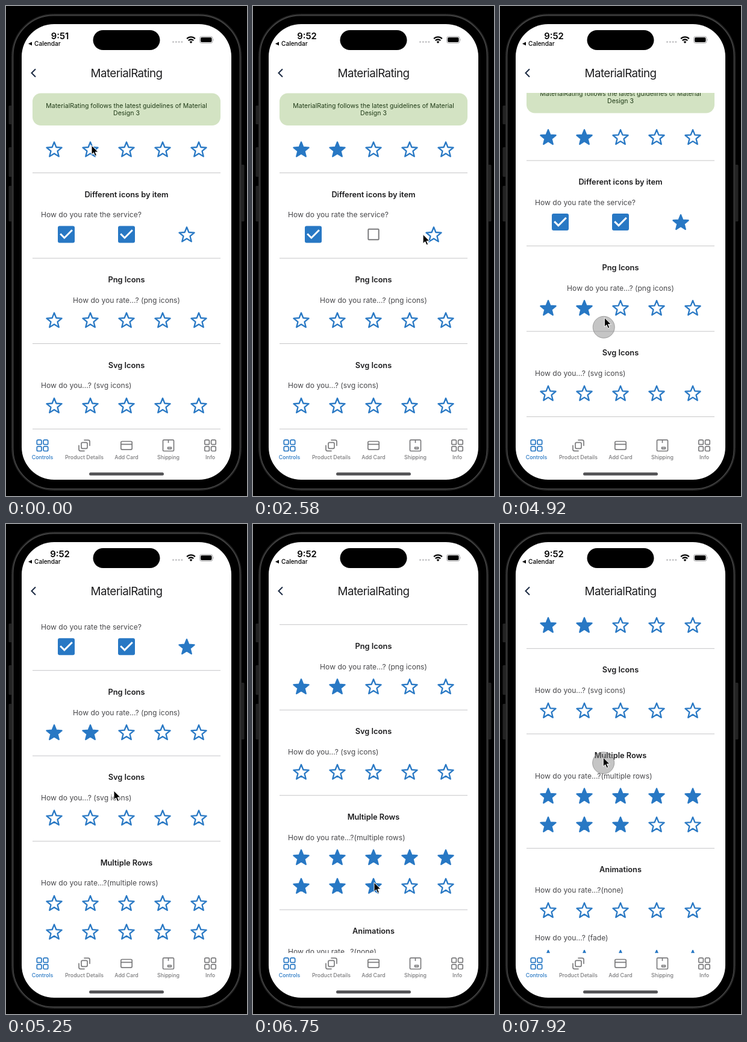
These frames come from a looping animation (400 by 812 pixels, 8000 ms). An HTML page:

```html
<!DOCTYPE html>
<html lang="en">
<head>
<meta charset="utf-8">
<title>Rating controls</title>
<style>
  html, body { margin: 0; width: 100%; height: 100%; overflow: hidden; background: #000; }
  svg { display: block; width: 100%; height: 100%; }
  text { font-family: Inter, Roboto, sans-serif; }
  .middle { text-anchor: middle; }
  .heading { font-size: 12.8px; font-weight: 600; fill: #1c1c1e; text-anchor: middle; }
  .label { font-size: 12.1px; fill: #49494c; }
  .banner { font-size: 10.5px; fill: #1f3a16; text-anchor: middle; }
  .title { font-size: 18.8px; letter-spacing: -.6px; fill: #1c1c1e; text-anchor: middle; }
  .tab { font-size: 8.8px; font-weight: 500; text-anchor: middle; }
  .icon { fill: none; stroke-width: 1.7; stroke-linejoin: round; stroke-linecap: round; }
</style>
</head>
<body>
<svg id="stage" viewBox="0 0 400 812"></svg>
<script>
const LOOP = 8000, BLUE = '#2878c4', GREY = '#7b7b7d';
const COLUMNS = [80, 140, 200, 260, 320];

// Rating of each control over time
const ratings = {
  basic: t => t < 330 ? 0 : 2,
  mixed: t => t < 1580 ? 2 : t < 2930 ? 1 : 3,
  png: t => t < 3880 ? 0 : 2,
  rows: t => t < 6580 ? 0 : 8,
  none: () => 0
};

const rect = (x, y, w, h, r, attrs) =>
  `<rect x="${x}" y="${y}" width="${w}" height="${h}" rx="${r}" ${attrs}/>`;
const text = (cls, x, y, content, attrs = '') =>
  `<text class="${cls}" x="${x}" y="${y}" ${attrs}>${content}</text>`;
const heading = (y, content) => text('heading', 200, y + 4.5, content);
const label = (y, content) => text('label', 58, y + 4.3, content);
const divider = y => rect(44, y - .5, 312, 1, 0, 'fill="#c6c6c8"');

// An item holds its filled and empty looks; only one is shown at a time
const item = (control, index, x, y, on, off) =>
  `<g class="item" data-control="${control}" data-index="${index}" transform="translate(${x} ${y})">
    <g>${on}</g><g>${off}</g></g>`;
const starPoints = Array.from({ length: 10 }, (_, i) => {
  const radius = i % 2 ? 5.8 : 13.2, angle = i * Math.PI / 5;
  return `${(radius * Math.sin(angle)).toFixed(2)},${(1.2 - radius * Math.cos(angle)).toFixed(2)}`;
}).join(' ');
const starShape = fill =>
  `<polygon points="${starPoints}" fill="${fill}" stroke="${BLUE}" stroke-width="2.3" stroke-linejoin="round"/>`;
const star = (control, index, x, y) =>
  item(control, index, x, y, starShape(BLUE), starShape('#fff'));
const starRow = (control, y, first = 0) =>
  COLUMNS.map((x, i) => star(control, first + i, x, y)).join('');
const checkbox = (index, x, y) => item('mixed', index, x, y,
  rect(-14, -14, 28, 28, 3, `fill="${BLUE}"`) +
    '<path d="M-9.8-1l6.7 6.7L9.8-7.2" fill="none" stroke="#fff" stroke-width="3"/>',
  rect(-8.7, -8.7, 17.4, 17.4, 1.2, `fill="none" stroke="${GREY}" stroke-width="2"`));

const content = [
  rect(44, 144.5, 312, 53.5, 14, 'fill="#d3e3c3"'),
  text('banner', 200, 169, 'MaterialRating follows the latest guidelines of Material'),
  text('banner', 200, 181.3, 'Design 3'),
  starRow('basic', 237.5), divider(276.5),
  heading(312, 'Different icons by item'), label(346, 'How do you rate the service?'),
  checkbox(0, 100, 378.5), checkbox(1, 200, 378.5), star('mixed', 2, 300, 378.5), divider(418),
  heading(453.5, 'Png Icons'),
  text('label middle', 200, 492, 'How do you rate...? (png icons)'),
  starRow('png', 520.5), divider(559.5),
  heading(595, 'Svg Icons'), label(629, 'How do you...? (svg icons)'),
  starRow('none', 662), divider(701),
  heading(736.5, 'Multiple Rows'), label(770.5, 'How do you rate...?(multiple rows)'),
  starRow('rows', 803.5), starRow('rows', 851, 5), divider(890.5),
  heading(926, 'Animations'), label(960, 'How do you rate...?(none)'),
  starRow('none', 993), label(1039, 'How do you...? (fade)'), starRow('none', 1072)
].join('');

const gridIcon = [[-9.2, -9.2], [1.6, -9.2], [-9.2, 1.6], [1.6, 1.6]]
  .map(([x, y]) => rect(x, y, 7.6, 7.6, 1.8, '')).join('');
const tabs = [
  ['Controls', 60.5, gridIcon],
  ['Product Details', 130, rect(-5, -5, 10, 10, 2, '') +
    '<path d="M0-9h6.5q2.5 0 2.5 2.5V0M-9 0v6.5Q-9 9-6.5 9H0"/>'],
  ['Add Card', 200, rect(-9.2, -6.8, 18.4, 13.6, 2, '') + '<path d="M-9-2H9"/>'],
  ['Shipping', 269.5, rect(-9, -9.2, 18, 18.4, 1.5, '') + '<path d="M0-9v4"/>' + rect(-1, 3, 6, 2.5, .5, '')],
  ['Info', 339, gridIcon]
].map(([name, x, icon], i) => {
  const color = i ? GREY : BLUE;
  return `<g class="icon" stroke="${color}" transform="translate(${x} 728.3)">${icon}</g>` +
    text('tab', x, 751.3, name, `fill="${color}"`);
}).join('');

const phone = [
  [4.5, 165, 31], [4.5, 234, 49], [4.5, 298, 59], [390, 263, 94]
].map(([x, y, h]) => rect(x, y, 5.5, h, 1.5, 'fill="#232323"')).join('') +
  rect(9.5, 13.5, 381, 789, 69, 'fill="#111" stroke="#2b2b2b"') +
  rect(11.5, 15.5, 377, 785, 67, 'fill="#000" stroke="#424242" stroke-width="1.8"') +
  rect(26, 30, 348, 755, 54, 'fill="#fff"');

const statusBar =
  text('middle', 89.5, 54.5, '', 'id="clock" font-size="14.8" font-weight="600"') +
  '<path d="M37 62.5l6-3v6z"/>' +
  text('', 47, 66.2, 'Calendar', 'font-size="10.1" font-weight="500"') +
  rect(144.5, 40, 111, 33, 16.5, '') +
  [277.5, 282.3, 287.1, 291.9].map(x => `<circle cx="${x}" cy="59.5" r="1.5" fill="#c4c4c6"/>`).join('') +
  `<g fill="none" stroke="#000" stroke-width="2.3">
    <path d="M300.2 54.2a9.6 9.6 0 0 1 13.6 0M302.8 57.2a6 6 0 0 1 8.4 0"/></g>
  <path d="M307 62l-2.3-2.6a3.4 3.4 0 0 1 4.6 0z"/>` +
  rect(321.5, 50.5, 21.5, 11, 3.2, 'fill="none" stroke="#a0a0a2"') +
  rect(323, 52, 18.5, 8, 2, '') + '<path d="M344.3 54.2q1.6 1.8 0 3.6z" fill="#a0a0a2"/>';

const stage = document.getElementById('stage');
stage.innerHTML = `
  <clipPath id="viewport"><rect x="26" y="144" width="348" height="567"/></clipPath>
  <rect width="400" height="812"/>
  ${phone}${statusBar}
  <path d="M49 104.5l-6.5 6.5 6.5 6.5" fill="none" stroke="#1b2a42" stroke-width="2"/>
  ${text('title', 200, 117.8, 'MaterialRating')}
  <g clip-path="url(#viewport)"><g id="scroller">${content}</g></g>
  ${tabs}
  ${rect(138, 773, 124, 5, 2.5, 'fill="#555558"')}
  <circle id="touch" r="18" fill="#7c7c7c" fill-opacity=".44" stroke="#8c8c8c" stroke-width=".8"/>
  <path id="cursor" d="M0 0v15.2l3.5-3.3 2.4 5.6 2.6-1.1-2.4-5.4h4.9z" stroke="#fff" stroke-width="1"/>`;

const [clock, scroller, touch, cursor] =
  ['clock', 'scroller', 'touch', 'cursor'].map(id => document.getElementById(id));
const items = [...document.querySelectorAll('.item')];

const smooth = u => u * u * (3 - 2 * u);
const flick = u => u * u;

// Cursor stops: time, x, y, easing of the way there
const stops = [
  [0, 142, 231], [550, 142, 231], [1050, 201, 372], [2220, 201, 372], [2720, 301, 380],
  [3150, 301, 380], [3700, 142, 514], [4050, 142, 514], [4500, 171, 548.7], [4745, 171, 548.7],
  [5066, 179, 442, flick], [5900, 179, 442], [6350, 201, 594], [6850, 201, 594],
  [7300, 176, 500.2], [7420, 176, 500.2], [LOOP, 171, 380.8]
];
const presses = [[250, 390], [1500, 1640], [2850, 2990], [3800, 3940], [4700, 5066], [6500, 6640], [7400, LOOP]];

function cursorAt(t) {
  const i = Math.max(1, stops.findIndex(stop => stop[0] >= t));
  const [t0, x0, y0] = stops[i - 1];
  const [t1, x1, y1, ease = smooth] = stops[i];
  const u = ease(Math.max(0, (t - t0) / (t1 - t0)));
  return [x0 + (x1 - x0) * u, y0 + (y1 - y0) * u];
}

// Content follows the finger after a short dead zone, then coasts to rest
function scrollAt(t) {
  const dragged = startY => Math.max(0, startY - cursorAt(t)[1] - 11.7);
  if (t < 4745) return 0;
  if (t < 5066) return dragged(548.7);
  if (t < 7420) return 251.5 - 156.5 * Math.exp(-(t - 5066) / 257);
  return 251.5 + dragged(500.2);
}

const moveTo = (element, x, y) => element.setAttribute('transform', `translate(${x} ${y})`);
const show = (element, visible) => element.setAttribute('visibility', visible ? 'visible' : 'hidden');

function draw(t) {
  clock.textContent = t < 2000 ? '9:51' : '9:52';
  moveTo(scroller, 0, -scrollAt(t));
  for (const element of items) {
    const { control, index } = element.dataset;
    const filled = index < ratings[control](t);
    show(element.children[0], filled);
    show(element.children[1], !filled);
  }
  moveTo(cursor, ...cursorAt(t));
  moveTo(touch, ...cursorAt(Math.max(0, t - 50)));
  show(touch, presses.some(([from, to]) => t >= from && t < to));
}

const start = performance.now();
function frame() {
  draw((performance.now() - start) % LOOP);
  requestAnimationFrame(frame);
}
frame();
</script>
</body>
</html>
```
